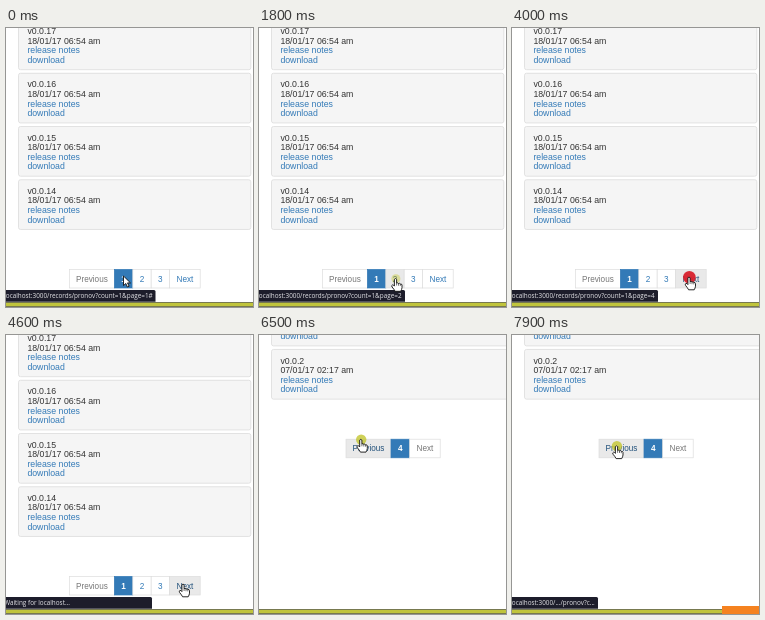
Animation, 247 px wide and 279 px high, one loop 8000 ms. Source, as an HTML page:

```html
<!DOCTYPE html>
<html lang="en">
<head>
<meta charset="utf-8">
<title>Paging through releases</title>
<style>
html, body { margin: 0; width: 100%; height: 100%; overflow: hidden; background: #fff; }
svg { display: block; width: 247px; height: 279px; }
text { font-family: "Liberation Sans", Arial, sans-serif; white-space: pre; }
.card text { font-size: 8.75px; fill: #333; }
.card .link { fill: #337ab7; }
.pager text { font-size: 8.2px; }
#status text { font: 6.37px "Open Sans", sans-serif; fill: #e4e4e8; }
</style>
</head>
<body>
<svg id="stage" viewBox="0 0 247 279" xmlns="http://www.w3.org/2000/svg">
  <rect width="247" height="279" fill="#fff"/>
  <g id="first"></g>
  <g id="last"></g>
  <rect y="274" width="247" height="5" fill="#77794f"/>
  <rect y="275" width="247" height="3" fill="#c0c43c"/>
  <g id="status">
    <path id="plate" fill="#1d1d2b"/>
    <text x="-1.8" y="270.4"></text>
  </g>
  <rect id="badge" x="210" y="271" width="37" height="8" fill="#f58220"/>
  <circle id="halo"/>
  <g id="cursor" stroke="#111" stroke-width=".9" fill="#fff" stroke-linejoin="round">
    <path id="arrow" d="M0 0V9.6L2.3 7.5L3.9 11L5.6 10.2L4 6.9H7Z"/>
    <g id="hand">
      <path d="M-1.1 .8Q0-.7 1.1 .8V4.6Q2.2 3.9 3 5Q4.2 4.4 4.8 5.5Q6.3 5.1 6.5 6.6V9.2Q6.3 11 5.2 12.8H-.4Q-1.4 10.8-3.4 8.5Q-4.4 6.9-3 6.4Q-2 6.2-1.1 7.6Z"/>
      <path d="M1.1 4.6V7M3 5V7.2M4.8 5.5V7.4" fill="none" stroke-width=".6"/>
    </g>
  </g>
</svg>
<script>
const LOOP = 8000;
const $ = id => document.getElementById(id);
const clamp = v => Math.min(1, Math.max(0, v));
const ease = v => v * v * (3 - 2 * v);

function card(center, right, version, date) {
  const line = (s, i, cls = "") =>
    `<text class="${cls}" x="21.4" y="${center + 3.1 + i * 9.6}">${s}</text>`;
  return `<g class="card"><rect x="12.5" y="${center - 11}" width="${right - 12.5}" height="49.7"
    rx="2" fill="#f5f5f5" stroke="#dcdcdc" stroke-width=".8"/>` +
    line(version, 0) + line(date, 1) +
    line("release notes", 2, "link") + line("download", 3, "link") + "</g>";
}

function cards(n, center, right, newest, date) {
  return Array.from({ length: n }, (_, i) =>
    card(center + i * 53.25, right, "v0.0." + (newest - i), date)).join("");
}

// Builds the pager and returns its clickable areas.
function addPager(group, left, top, items) {
  const areas = [];
  let x = left, html = "";
  for (const [label, width, state] of items) {
    const active = state === "active";
    const ink = active ? "#fff" : state === "off" ? "#777" : "#337ab7";
    html += `<rect x="${x}" y="${top}" width="${width}" height="18.6" fill="${active ? "#337ab7" : "#fff"}"
      stroke="${active ? "#337ab7" : "#ddd"}" stroke-width=".7"/>
      <text x="${x + width / 2}" y="${top + 12.2}" text-anchor="middle"
      font-weight="${active ? 700 : 400}" fill="${ink}">${label}</text>`;
    areas.push({ x, top, width, state });
    x += width;
  }
  group.insertAdjacentHTML("beforeend", `<g class="pager">${html}</g>`);
  const rects = group.querySelectorAll(".pager rect");
  const texts = group.querySelectorAll(".pager text");
  areas.forEach((a, i) => { a.rect = rects[i]; a.text = texts[i]; });
  return areas;
}

$("first").innerHTML = cards(4, 3, 244.8, 17, "18/01/17 06:54 am");
$("last").innerHTML = cards(2, -27.8, 256, 3, "07/01/17 02:17 am");
const firstPager = addPager($("first"), 63.4, 241.4, [
  ["Previous", 45, "off"], ["1", 18.4, "active"], ["2", 18.4], ["3", 18.4], ["Next", 30.6]]);
const lastPager = addPager($("last"), 87, 104.2, [
  ["Previous", 45], ["4", 18.6, "active"], ["Next", 30.6, "off"]]);

// start, end, x, y: the pointer rests between moves
const moves = [
  [0, 0, 117.5, 248], [400, 850, 136.5, 250.5], [2150, 2600, 151, 251],
  [3200, 3600, 177, 249], [5600, 6300, 101.8, 104.3], [7100, 7900, 104.5, 110.8]];

function pointer(t) {
  let x = 0, y = 0;
  for (const [start, end, toX, toY] of moves) {
    if (t < start) break;
    const k = end > start ? ease(clamp((t - start) / (end - start))) : 1;
    x += (toX - x) * k;
    y += (toY - y) * k;
  }
  return { x, y };
}

const halos = [
  { start: 1350, end: 2050, color: "#c9c93a", r: 4.5, alpha: .45 },
  { start: 3750, end: 4450, color: "#d8202c", r: 6.3, alpha: .95 },
  { start: 6250, end: 8200, color: "#c3c62f", r: 5.2, alpha: .8 }];

const url = "localhost:3000/records/pronov?count=1&amp;page=";
// start, text, plate width
const messages = [
  [0, url + "1#", 149.5], [580, url + "2", 146], [2370, url + "3", 146],
  [3400, url + "4", 146], [4500, "Waiting for localhost...", 146],
  [5700, "", 0], [7000, "localhost:3000/.../pronov?c...", 86]];

function hover(areas, p) {
  let link = false;
  for (const a of areas) {
    const over = !a.state && p.x >= a.x && p.x < a.x + a.width &&
      p.y >= a.top - .5 && p.y < a.top + 18.6;
    if (a.state) continue;
    a.rect.setAttribute("fill", over ? "#e9e9e9" : "#fff");
    a.text.setAttribute("fill", over ? "#23527c" : "#337ab7");
    link = link || over;
  }
  return link;
}

let shown;
function draw(t) {
  const onLast = t >= 5200;
  $("first").style.display = onLast ? "none" : "";
  $("last").style.display = onLast ? "" : "none";

  const p = pointer(t);
  const link = hover(onLast ? lastPager : firstPager, p) || (onLast && t < 5600);
  $("cursor").setAttribute("transform", `translate(${p.x} ${p.y})`);
  $("arrow").style.display = link ? "none" : "";
  $("hand").style.display = link ? "" : "none";

  const halo = halos.find(h => t >= h.start && t < h.end);
  $("halo").style.display = halo ? "" : "none";
  if (halo) {
    const k = clamp((t - halo.start) / 150) * clamp((halo.end - t) / 150);
    const attrs = { cx: p.x + .4, cy: p.y + .3, r: halo.r * (.5 + .5 * k),
      fill: halo.color, opacity: halo.alpha * k };
    for (const name in attrs) $("halo").setAttribute(name, attrs[name]);
  }

  const message = messages.filter(m => t >= m[0]).pop();
  if (message !== shown) {
    shown = message;
    const w = message[2];
    $("status").querySelector("text").innerHTML = message[1];
    $("plate").setAttribute("d", w ? `M0 262H${w - 1.5}Q${w} 262 ${w} 263.5V273.8H0Z` : "");
  }
  const fade = onLast && t < 5700 ? 1 - .18 * clamp((t - 5200) / 300) - .8 * clamp((t - 5520) / 180) : 1;
  $("status").setAttribute("opacity", Math.max(0, fade));
  $("badge").style.display = t >= 7850 ? "" : "none";
}

function tick() {
  draw(performance.now() % LOOP);
  requestAnimationFrame(tick);
}
tick();
</script>
</body>
</html>
```
